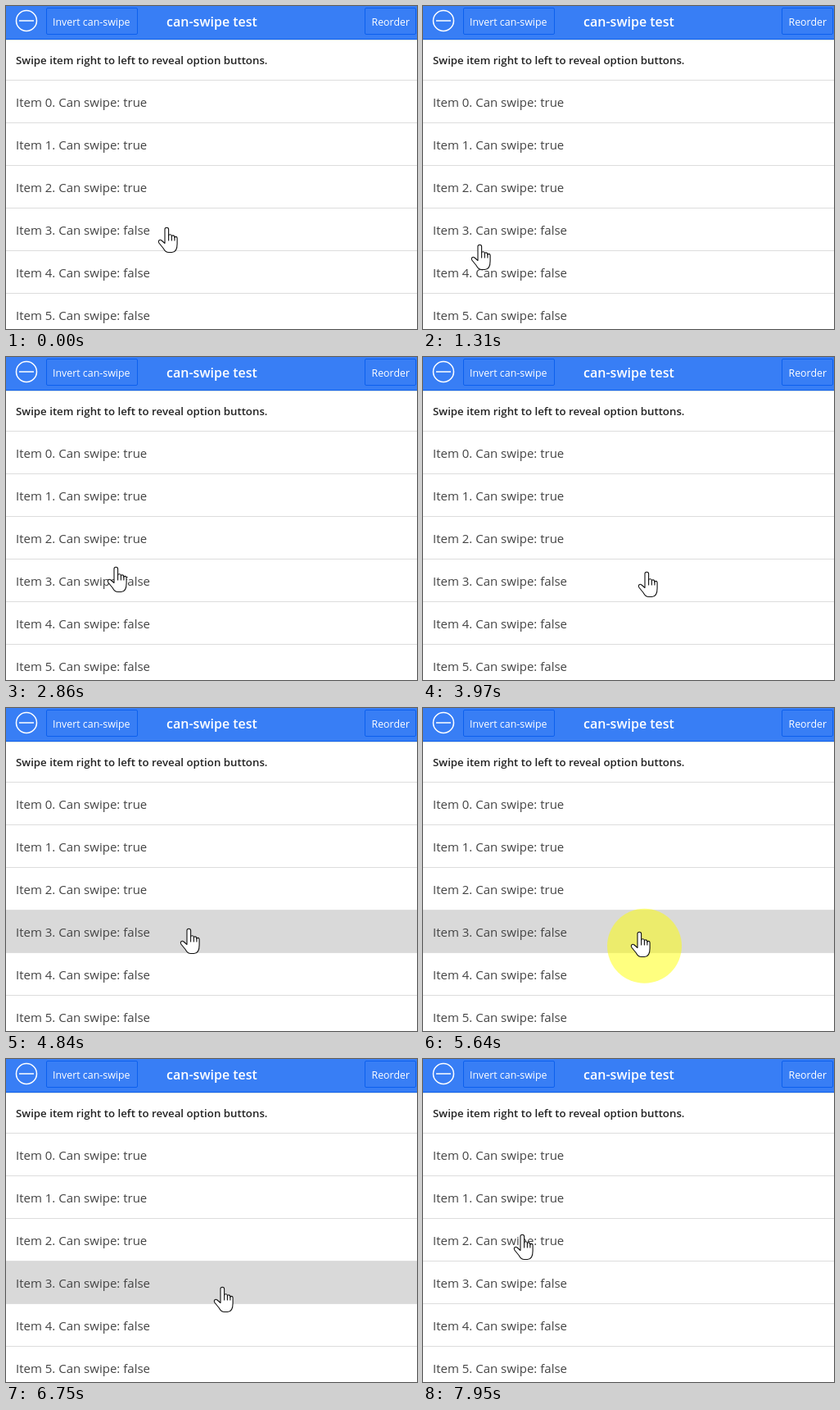
Animation of 502x394 px, one loop 8 s. Source, as an HTML page:

```html
<!DOCTYPE html>
<html lang="en">
<head>
<meta charset="utf-8">
<title>can-swipe test</title>
<style>
  html, body { margin: 0; width: 100%; height: 100%; overflow: hidden; background: #fff; }
  svg { display: block; font-family: "Open Sans", "Noto Sans", sans-serif; }
  .item { font-size: 15px; fill: #444; }
  .hint { font-size: 13.27px; font-weight: 600; fill: #222; }
  .title { font-size: 16px; font-weight: 600; fill: #fff; }
  .label { font-size: 12.4px; font-weight: 500; fill: #fff; }
  .button { fill: #387ef5; stroke: #0c60ee; }
  .icon { fill: none; stroke: #fff; stroke-width: 1.5; }
  .hand { fill: #fff; stroke: #111; stroke-width: 1.1; stroke-linejoin: round; stroke-linecap: round; }
</style>
</head>
<body>
<svg width="502" height="394" viewBox="0 0 502 394">
  <rect width="502" height="394" fill="#fff"/>
  <rect id="active" y="247" width="502" height="51" fill="#d9d9d9"/>
  <g id="list"></g>

  <rect width="502" height="42" fill="#e6e6e6"/>
  <rect width="502" height="41" fill="#0c60ee"/>
  <rect width="502" height="40" fill="#387ef5"/>
  <g class="icon">
    <circle cx="25" cy="18" r="12.5"/>
    <path d="M16 18h18"/>
  </g>
  <rect class="button" x="49.5" y="2.5" width="111" height="32" rx="1.5"/>
  <rect class="button" x="438.5" y="2.5" width="62" height="32" rx="1.5"/>
  <text class="label" x="57" y="24">Invert can-swipe</text>
  <text class="title" x="251.5" y="25" text-anchor="middle">can-swipe test</text>
  <text class="label" x="446.5" y="24">Reorder</text>
  <text class="hint" x="12" y="71">Swipe item right to left to reveal option buttons.</text>

  <circle id="press" cx="270.5" cy="290.3" r="45.5" fill="#ff0" fill-opacity=".5"/>
  <g id="cursor" class="hand">
    <path d="M8 19V2.5a2.3 2.3 0 0 1 4.6 0V10.2c0-2 3.8-2 3.8.4v.6c0-2 3.5-1.8 3.5.6v.8c0-1.8 3.2-1.6 3.2.6V20c0 6-2 10.5-6.5 10.5h-4c-4 0-5-2.5-6.5-5L.8 19C-.8 16 2 14.2 4 16L8 19.5"/>
    <path d="M12.6 10v6M16.4 11v5M19.9 12v4" fill="none"/>
  </g>
</svg>
<script>
const LOOP = 8000, FIRST_STEP = 645, STEP = 110.6;
const SWIPE_START = 35, SWIPE_END = 60, SWIPE_PERIOD = 10, HELD_STEPS = 4;
const byId = id => document.getElementById(id);
const list = byId('list'), active = byId('active'), press = byId('press'), cursor = byId('cursor');

for (let i = 0; i < 6; i++) {
  const y = 90 + 52 * i;
  list.innerHTML += `<rect y="${y}" width="502" height="1" fill="#ddd"/>
    <text class="item" x="12" y="${y + 33}">Item ${i}. Can swipe: ${i < 3}</text>`;
}

// Two clockwise sweeps over the list, then a rest: step, x, y.
const wander = [
  [-1, 186, 270], [6, 59, 291], [9, 64, 272], [13, 182, 245], [16, 160, 289],
  [20, 124, 256], [25, 204, 282], [30, 263, 262], [32, 263, 262], [35, 254, 268]
];

// Smooth curve through the points, at rest at both ends.
function spline(points, n) {
  const last = points.length - 1;
  const i = Math.max(0, Math.min(last - 1, points.findIndex(p => p[0] > n) - 1));
  const a = points[i], b = points[i + 1], span = b[0] - a[0];
  const u = Math.max(0, (n - a[0]) / span);
  const slope = (j, axis) => {
    if (j === 0 || j === last) return 0;
    const p = points[j - 1], q = points[j + 1];
    return (q[axis] - p[axis]) / (q[0] - p[0]) * span;
  };
  return [1, 2].map(axis => {
    const blend = u * u * (3 - 2 * u);
    return a[axis] + (b[axis] - a[axis]) * blend
      + slope(i, axis) * u * (1 - u) ** 2 - slope(i + 1, axis) * u * u * (1 - u);
  });
}

const swipePhase = n => (n - SWIPE_START) % SWIPE_PERIOD;
const swiping = n => n >= SWIPE_START && n < SWIPE_END;

function swipe(n) {
  const turn = swipePhase(n) / (SWIPE_PERIOD - 1);
  return [204 + 50 * Math.cos(2 * Math.PI * turn), 273 + (n - 45) / 2];
}

function leave(n) {
  const u = Math.min(1, (n - SWIPE_END) / 6);
  const ease = Math.sin(u * Math.PI / 2);
  return [157 - 46 * ease, 279 - 65 * ease];
}

function cursorAt(n) {
  if (n < SWIPE_START) return spline(wander, n);
  return swiping(n) ? swipe(n) : leave(n);
}

const show = (el, on) => el.setAttribute('visibility', on ? 'visible' : 'hidden');

function draw() {
  const now = performance.now() % LOOP;
  const n = Math.max(-1, Math.floor((now - FIRST_STEP) / STEP));
  cursor.setAttribute('transform', `translate(${cursorAt(n).map(Math.round)})`);
  show(active, swiping(n) && swipePhase(n) < HELD_STEPS);
  show(press, n === SWIPE_START + SWIPE_PERIOD);
  requestAnimationFrame(draw);
}
draw();
</script>
</body>
</html>
```
